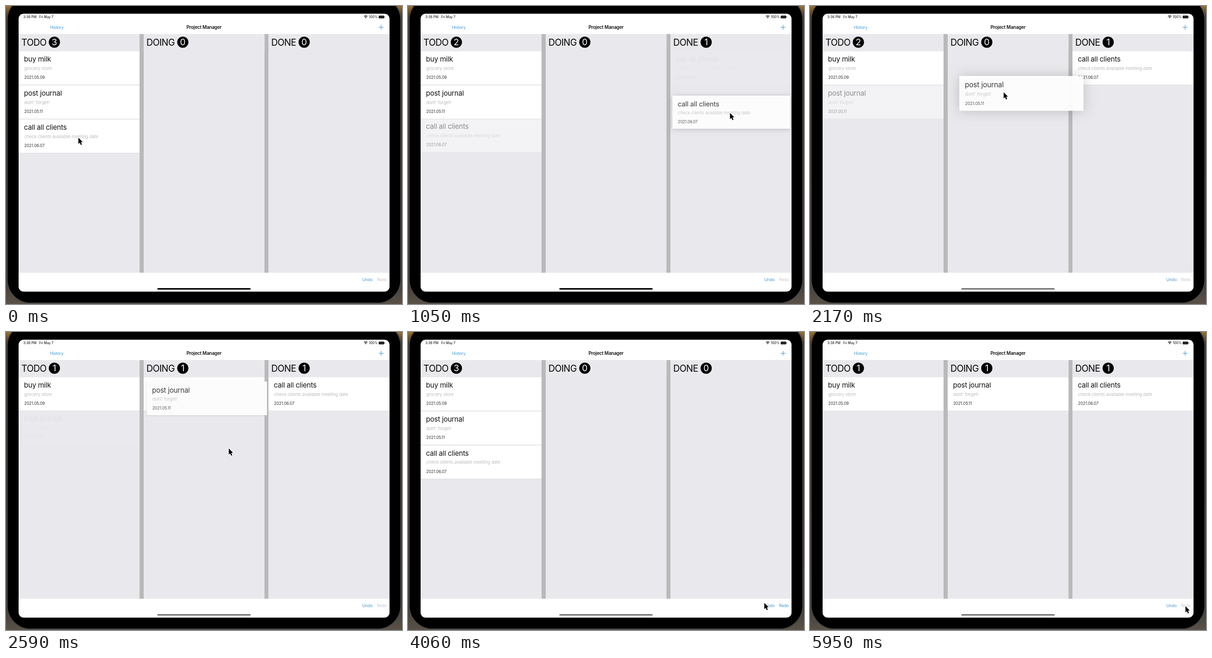
Animation of 848x638 px, one loop 6.44 s. Source, as an HTML page with a canvas:

```html
<!DOCTYPE html>
<html lang="en">
<head>
<meta charset="utf-8">
<title>Project Manager</title>
<style>
html, body { margin: 0; width: 100%; height: 100%; overflow: hidden; background: #000; }
canvas { display: block; }
</style>
</head>
<body>
<canvas id="stage" width="848" height="638"></canvas>
<script>
const ctx = document.getElementById('stage').getContext('2d');
const LOOP = 6440, STEP = 70;
const FONT = 'Inter, "Liberation Sans", sans-serif';
const BLUE = '#429bd6', PALE = '#c9c9cc';
const COL_X = [27, 294.7, 562], COL_W = 259, COL_TOP = 60, COL_H = 511;
const TOP = 97, ROW = 73, CELL = 71.3;

const buy = { title: 'buy milk', note: 'grocery store', date: '2021.05.09', row: 0 };
const post = { title: 'post journal', note: "dont' forget!", date: '2021.05.11', row: 1 };
const call = { title: 'call all clients', note: 'check clients available meeting date', date: '2021.06.07', row: 2 };

// Every transfer between columns; drags also carry the lift time and the grab point.
const moves = [
  { item: call, from: 0, to: 2, at: 1010, dur: 300, drag: { lift: 280, follow: 490, gx: 126.5, gy: 36.8 } },
  { item: post, from: 0, to: 1, at: 2345, dur: 300, drag: { lift: 1680, follow: 1890, gx: 92.5, gy: 32.8 } },
  { item: post, from: 1, to: 0, at: 3115, dur: 300 },
  { item: call, from: 2, to: 0, at: 3840, dur: 230 },
  { item: call, from: 0, to: 2, at: 4600, dur: 230 },
  { item: post, from: 0, to: 1, at: 5300, dur: 230 }
];

const cursorPath = [
  [0, 155, 282], [490, 155, 282], [910, 689.5, 229], [1050, 689.5, 229],
  [1540, 120, 204], [1680, 120, 204], [1890, 138, 245.5], [2170, 414.7, 184.7],
  [2310, 424, 188], [2450, 424, 188], [3010, 763, 580], [4200, 763, 580],
  [4480, 806.5, 586.5], [5600, 806.5, 586.5], [5740, 804, 587]
];

const lerp = (a, b, p) => a + (b - a) * p;
const ease = (t, start, dur) => {
  const p = Math.min(1, Math.max(0, (t - start) / dur));
  return p * p * (3 - 2 * p);
};
const within = (t, a, b) => t >= a && t < b;

function cursorAt(t) {
  const i = cursorPath.findIndex(k => k[0] > t);
  if (i < 0) return cursorPath[cursorPath.length - 1].slice(1);
  const [a, b] = [cursorPath[i - 1], cursorPath[i]];
  const p = ease(t, a[0], b[0] - a[0]);
  return [lerp(a[1], b[1], p), lerp(a[2], b[2], p)];
}

function rect(x, y, w, h, color) {
  ctx.fillStyle = color;
  ctx.fillRect(x, y, w, h);
}

function roundRect(x, y, w, h, r) {
  ctx.beginPath();
  ctx.roundRect(x, y, w, h, r);
}

function text(str, x, y, size, color, { spacing = 0, weight = 400, align = 'left' } = {}) {
  ctx.font = `${weight} ${size}px ${FONT}`;
  ctx.letterSpacing = spacing + 'px';
  ctx.textAlign = align;
  ctx.fillStyle = color;
  ctx.fillText(str, x, y);
}

function cellText(item) {
  text(item.title, 11.5, 22.4, 15, '#111', { spacing: -0.2 });
  text(item.note, 12, 39.6, 9.6, '#bdbdbf', { spacing: -0.15 });
  text(item.date, 12, 59.2, 8.7, '#333', { spacing: -0.15 });
}

function cell(item, x, y, alpha) {
  ctx.save();
  ctx.globalAlpha = alpha;
  ctx.translate(x, y);
  rect(0, CELL, COL_W, ROW - CELL, '#e3e3e7');
  rect(0, 0, COL_W, CELL, '#fff');
  cellText(item);
  ctx.restore();
}

// held runs from 0 (resting in its row) to 1 (translucent in the hand)
function preview(item, x, y, scale, held, blur) {
  ctx.save();
  ctx.translate(x, y);
  ctx.scale(scale, scale);
  ctx.globalAlpha = lerp(1, 0.95, held);
  ctx.shadowColor = 'rgba(0,0,0,.2)';
  ctx.shadowBlur = blur;
  ctx.shadowOffsetY = 1;
  rect(0, -1.2, COL_W, 72.6, '#fff');
  ctx.shadowColor = 'transparent';
  ctx.globalAlpha = lerp(1, 0.82, held);
  cellText(item);
  ctx.restore();
}

function bezel() {
  const wall = ctx.createLinearGradient(0, 0, 0, 638);
  wall.addColorStop(0, '#9a7030');
  wall.addColorStop(0.04, '#3a3028');
  wall.addColorStop(0.9, '#3a3633');
  wall.addColorStop(1, '#5a5248');
  rect(0, 0, 848, 638, wall);
  roundRect(2.5, -20, 843, 656, 50);
  ctx.fillStyle = '#000';
  ctx.fill();
  ctx.strokeStyle = '#4c4a49';
  ctx.lineWidth = 2;
  ctx.stroke();
}

function statusBar() {
  const style = { weight: 500 };
  text('3:36 PM', 37, 26, 7, '#222', style);
  text('Fri May 7', 71, 26, 7, '#222', style);
  text('100%', 777, 26, 7, '#222', style);
  ctx.strokeStyle = '#222';
  ctx.lineWidth = 1.2;
  for (const r of [2.6, 5]) {
    ctx.beginPath();
    ctx.arc(770.3, 25.7, r, -Math.PI * 0.77, -Math.PI * 0.23);
    ctx.stroke();
  }
  ctx.beginPath();
  ctx.arc(770.3, 25.3, 1, 0, Math.PI * 2);
  ctx.fill();
  roundRect(798, 20.5, 12, 6, 1.5);
  ctx.fill();
  rect(810.7, 22.3, 1, 2.4, '#555');
}

function chrome(t) {
  statusBar();
  text('History', 94, 48.6, 9, BLUE, { spacing: -0.2 });
  text('Project Manager', 424, 48.8, 9.8, '#111', { spacing: -0.2, weight: 600, align: 'center' });
  rect(798, 45, 10.5, 1.1, BLUE);
  rect(802.7, 40.3, 1.1, 10.5, BLUE);

  const pressed = [[3080, 3430], [3850, 4060], [4620, 4830], [5110, 5320]].findIndex(p => within(t, ...p));
  const canRedo = within(t, 3080, 5300);
  const label = (str, x, color, dim) => {
    ctx.globalAlpha = dim ? 0.4 : 1;
    text(str, x, 589, 9, color, { spacing: -0.2 });
    ctx.globalAlpha = 1;
  };
  label('Undo', 763, BLUE, pressed === 0 || pressed === 1);
  label('Redo', 794.5, canRedo ? BLUE : PALE, pressed > 1);

  roundRect(324, 604, 200, 3.2, 1.6);
  ctx.fillStyle = t < 1750 ? '#000' : '#777';
  ctx.fill();
}

// Latest transfer touching this item and column decides how its row looks.
function row(item, col, t) {
  let shown = col === 0 ? 1 : 0, shift = 0;
  for (const m of moves) {
    if (m.item !== item) continue;
    const p = ease(t, m.at, m.dur);
    if (m.drag && col === m.from && within(t, m.drag.lift, m.at)) shown = 0.45;
    if (t < m.at) continue;
    if (col === m.from) {
      shown = (m.drag ? 0.48 : 1) * (1 - p);
      shift = m.drag ? -2 : 0;
    } else if (col === m.to) {
      shown = col === 0 ? 1 : p;
      shift = col === 0 ? -ROW * (1 - p) : 0;
    }
  }
  if (shown > 0) cell(item, COL_X[col], TOP + shift + (col === 0 ? item.row * ROW : 0), shown);
}

function columns(t) {
  const counts = [3, 0, 0];
  for (const m of moves) if (t >= m.at) { counts[m.from]--; counts[m.to]++; }

  rect(27, COL_TOP, 794, COL_H, '#b9b9ba');
  const names = ['TODO', 'DOING', 'DONE'], badges = [103.6, 378.6, 638.5];
  names.forEach((name, col) => {
    const x = COL_X[col];
    ctx.save();
    ctx.beginPath();
    ctx.rect(x, COL_TOP, COL_W, COL_H);
    ctx.clip();
    rect(x, COL_TOP, COL_W, COL_H, '#e9e9ed');
    for (const item of [call, post, buy]) row(item, col, t);
    rect(x, COL_TOP, COL_W, 35.5, '#e9e9ed');
    text(name, x + 6, 84.6, 19.5, '#050505', { spacing: -0.6 });
    ctx.beginPath();
    ctx.arc(badges[col], 77.5, 12, 0, Math.PI * 2);
    ctx.fillStyle = '#000';
    ctx.fill();
    text(counts[col], badges[col], 84.4, 19, '#fff', { align: 'center' });
    ctx.restore();
  });
}

function dragged(m, t, cx, cy) {
  const { lift, follow, gx, gy } = m.drag;
  const drop = m.at + 40;
  if (!within(t, lift, drop + 280)) return;
  const fly = ease(t, drop, 280);
  const held = ease(t, follow, 200);
  const up = 1 + 0.017 * ease(t, lift, 200) + 0.01 * held;
  const scale = t < m.at ? up : lerp(0.975, 1, fly);
  // During the fly-in the card starts from where it was released.
  const [hx, hy] = t < drop ? [cx, cy] : cursorAt(drop);
  let x = lerp(COL_X[m.from] - COL_W * (scale - 1) / 2, hx - gx * scale, held);
  let y = lerp(TOP + m.item.row * ROW - CELL * (scale - 1) / 2, hy - gy * scale, held);
  x = lerp(x, COL_X[m.to], fly);
  y = lerp(y, TOP, fly);
  ctx.save();
  if (t <= follow) {
    ctx.beginPath();
    ctx.rect(COL_X[m.from], COL_TOP, COL_W, COL_H);
    ctx.clip();
  }
  const blur = t < m.at ? 8 + 18 * held : 10 * (1 - fly);
  preview(m.item, x, y, scale, held, blur);
  ctx.restore();
}

function pointer(x, y) {
  ctx.save();
  ctx.translate(x, y);
  ctx.beginPath();
  ctx.moveTo(0, 0);
  for (const [px, py] of [[0, 13.2], [3, 10.5], [5.2, 15.6], [7.5, 14.6], [5.4, 9.6], [9.2, 9.3]]) ctx.lineTo(px, py);
  ctx.closePath();
  ctx.lineJoin = 'round';
  ctx.lineWidth = 1.8;
  ctx.strokeStyle = '#fff';
  ctx.stroke();
  ctx.fillStyle = '#000';
  ctx.fill();
  ctx.restore();
}

function draw(t) {
  const [cx, cy] = cursorAt(t);
  bezel();
  ctx.save();
  roundRect(27, 16.5, 794.3, 595, 11);
  ctx.clip();
  rect(27, 16, 795, 596, '#fff');
  columns(t);
  chrome(t);
  for (const m of moves) if (m.drag) dragged(m, t, cx, cy);
  pointer(cx, cy);
  ctx.restore();
}

const begin = performance.now();
function tick() {
  const t = (performance.now() - begin) % LOOP;
  draw(Math.floor(t / STEP) * STEP);
  requestAnimationFrame(tick);
}
tick();
</script>
</body>
</html>
```
